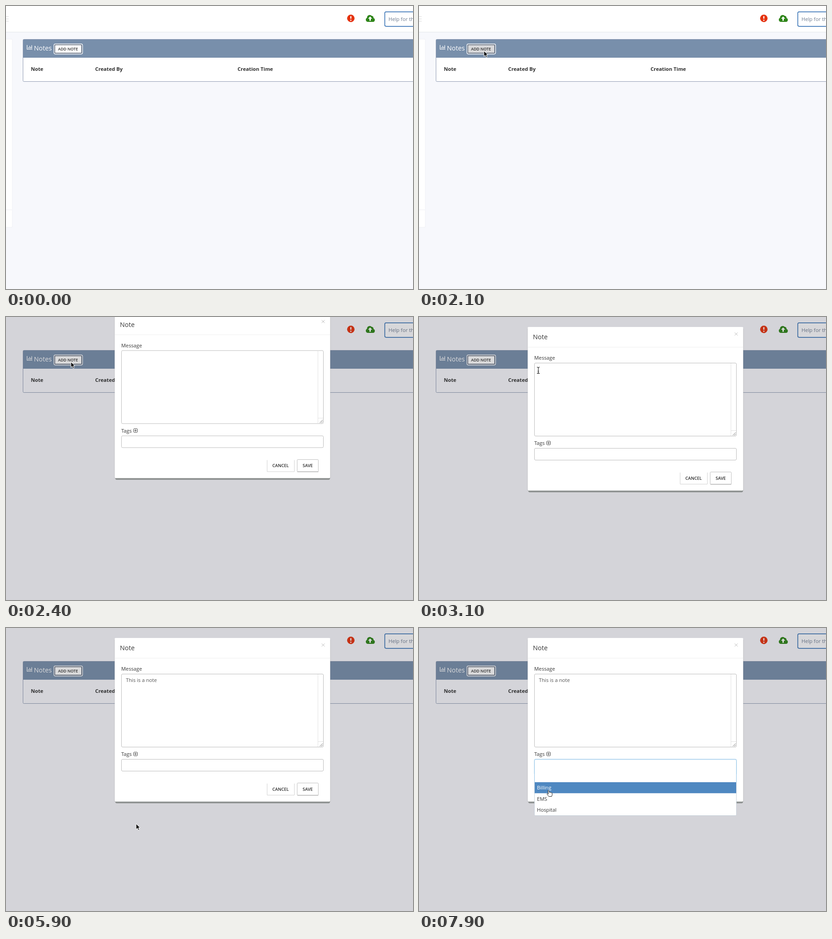
An HTML page that plays this animation: 897 by 624 pixels, repeating every 8000 ms.

```html
<!DOCTYPE html>
<html lang="en">
<head>
<meta charset="utf-8">
<title>Adding a note</title>
<style>
  html, body { margin: 0; width: 100%; height: 100%; overflow: hidden; background: #f7f8fc; }
  svg { display: block; width: 897px; height: 624px; }
  text { font: 11.2px "Open Sans", sans-serif; fill: #383838; white-space: pre; }
  .title { font-size: 14.3px; }
  .head { font-weight: 700; fill: #303030; }
  .btn { font-size: 9.5px; font-weight: 600; fill: #2b2b2b; }
  .field { fill: #fff; stroke: #bcbcbc; }
  .line { fill: none; stroke: #444; }
</style>
</head>
<body>
<svg viewBox="0 0 897 624">
  <rect width="897" height="624" fill="#f7f8fc"/>

  <g id="panels">
    <rect width="897" height="57" fill="#fff"/>
    <path d="M0 57.5H897" stroke="#e3e5ea"/>
    <path d="M0 23.5H6M0 28.5H6M0 33.5H6" stroke="#d9d9d9"/>
    <rect x="-5" y="73" width="19" height="415" rx="2" fill="#fff" stroke="#eff0f4"/>
    <path d="M0 449.5H13" stroke="#edeff4"/>
    <rect x="38" y="114" width="870" height="52" fill="#fff"/>
  </g>

  <circle cx="760" cy="27.3" r="8.2" fill="#e5330f"/>
  <path d="M760 22.3V28" stroke="#fff" stroke-width="2.4"/>
  <circle cx="760" cy="31.4" r="1.4" fill="#fff"/>

  <path d="M797 35A4.8 4.8 0 0 1 795.6 26A6 6 0 0 1 806 21.8A4 4 0 0 1 810 26.5A4.4 4.4 0 0 1 809 35Z" fill="#2f8519"/>
  <path d="M802.5 23L807 28H804V32.5H801V28H798Z" fill="#fff"/>

  <rect x="834.8" y="12.8" width="80" height="32" rx="3" fill="#fff" fill-opacity=".5" stroke="#3f78b8" stroke-width="1.7"/>
  <text x="843" y="33" style="fill:#6f7d92">Help for the page</text>

  <rect x="37.5" y="73.5" width="880" height="93" rx="2" fill="none" stroke="#8e9ab2"/>
  <rect x="38" y="74" width="870" height="40" fill="#788fab"/>
  <path d="M46.5 86V95.5H58M49.5 94V91M52 94V88M54.5 94V90M56.7 94V86.5" fill="none" stroke="#fff" stroke-width="1.2"/>
  <text class="title" x="61.5" y="98.3" style="fill:#fff">Notes</text>

  <rect x="105.7" y="83.7" width="63" height="22" rx="3" fill="#62728b" stroke="#fff" stroke-width="1.4"/>
  <rect id="add" x="107.8" y="85.8" width="58.8" height="18" rx="1.5" stroke="#5b6472"/>
  <text class="btn" x="114.7" y="98.2" style="font-size:8.7px">ADD NOTE</text>

  <text class="head" x="54.7" y="142.6">Note</text>
  <text class="head" x="196.5" y="142.6">Created By</text>
  <text class="head" x="510.2" y="142.6">Creation Time</text>

  <rect id="shade" width="897" height="624" fill="#323237"/>

  <g id="modal">
    <rect x="238.5" y="24" width="477" height="360" rx="3" fill="#000" opacity=".1"/>
    <rect x="241" y="30" width="473" height="356.5" rx="3" fill="#8d9190"/>
    <rect x="239.5" y="22" width="475" height="360.8" rx="2" fill="#fff"/>
    <path d="M240 66.5H714" stroke="#efefef"/>
    <text class="title" x="251" y="49">Note</text>
    <path d="M695.7 34.2L702.3 40.8M702.3 34.2L695.7 40.8" stroke="#bbb"/>

    <text x="254" y="94">Message</text>
    <rect class="field" x="254.5" y="101.5" width="445" height="161" rx="2.5"/>
    <path d="M687.5 102V250.5H699M687.5 250V262" fill="none" stroke="#e2e2e2"/>
    <path d="M691.5 261L698 254.5M695 261L698 258" stroke="#777"/>
    <text id="message" x="264.3" y="118.6" xml:space="preserve" style="fill:#555"></text>

    <text x="254" y="282">Tags</text>
    <rect class="line" x="281.5" y="273.8" width="8" height="8" rx="1"/>
    <path class="line" d="M283 277.8H288M285.5 275.3V280.3"/>
    <rect class="field" x="254.5" y="289.5" width="445" height="26" rx="2.5"/>

    <path d="M575.5 343V368.5H635.5V343" fill="none" stroke="#d2d2d2"/>
    <text class="btn" x="587" y="358.8">CANCEL</text>
    <rect class="field" x="641.8" y="341.8" width="46.5" height="26.7" rx="1.5"/>
    <path d="M642 369H688.5" stroke="#aaa"/>
    <text class="btn" x="653.8" y="358.8">SAVE</text>
  </g>

  <g id="dropdown">
    <rect x="253.5" y="288.5" width="447" height="36" rx="4" fill="#c9e3f6"/>
    <rect x="254.5" y="316" width="445" height="97.5" rx="2" fill="#fff" stroke="#c9d3dc"/>
    <path d="M254.5 340V292.5Q254.5 289.8 257 289.8H697Q699.5 289.8 699.5 292.5V340" fill="#fff" stroke="#8fc2e6"/>
    <rect x="255" y="340" width="444" height="24.3" fill="#4f88c1"/>
    <text x="260" y="356.2" style="fill:#fff">Billing</text>
    <text x="260" y="380.8">EMS</text>
    <text x="260" y="405.4">Hospital</text>
  </g>

  <rect id="caret" width="1" height="15" fill="#444"/>

  <g id="pointer">
    <circle id="ring" cy="-.5" r="14.6" fill="#fff" fill-opacity=".6" stroke="#111" stroke-width="1.3"/>
    <path id="arrow" d="M0 0V12.3L2.9 9.6L5 14.3L7.2 13.3L5.2 8.8H9Z" fill="#111" stroke="#fff"/>
    <path id="ibeam" d="M-3 -6.5Q0 -6.5 0 -4.5Q0 -6.5 3 -6.5M0 -5V6M-3 7.5Q0 7.5 0 5.5Q0 7.5 3 7.5M-1.5 2.5H1.5" fill="none" stroke="#111" stroke-width="1.1"/>
    <path id="hand" d="M-.5 1.2Q.8 -.8 1.8 1.2L2.6 5L4 4.6L5.2 5.2L6.6 5.1L7.6 6.1Q9 6 9 7.8V10.5L7.8 14H1.5L-2.2 9.2Q-3 7.5 -1.2 7.6L.7 8.8Z" fill="#fff" stroke="#222"/>
  </g>
</svg>
<script>
  const LOOP = 8000, STEP = 100;
  const ui = Object.fromEntries([...document.querySelectorAll('[id]')].map(el => [el.id, el]));
  const MESSAGE = 'This is a note';

  // [time, value, ...] rows
  const PATH = [
    [100, 330, 405], [900, 150, 138], [1300, 143, 99], [2500, 143, 99],
    [3200, 270, 118], [5700, 270, 118], [5800, 287, 438], [6500, 283, 325],
    [6800, 282.5, 297.5], [7300, 282.5, 297.5], [7800, 284.5, 357.5]
  ];
  const SHADE = [[2100, 0], [2200, .11], [2300, .16], [2400, .175]];
  const SLIDE = [[2300, -66], [2400, -27.5], [2500, -7], [2600, 0]];
  const FADE = [[2200, 0], [2300, .6], [2400, 1]];

  const smooth = p => p * p * (3 - 2 * p);
  const within = (t, from, to) => t >= from && t < to;
  const show = (el, on) => el.setAttribute('visibility', on ? 'visible' : 'hidden');

  function sample(rows, t) {
    const next = rows.findIndex(row => row[0] > t);
    if (next === 0) return rows[0].slice(1);
    if (next < 0) return rows.at(-1).slice(1);
    const a = rows[next - 1], b = rows[next];
    const p = smooth((t - a[0]) / (b[0] - a[0]));
    return a.slice(1).map((v, i) => v + (b[i + 1] - v) * p);
  }

  function typedCount(t) {
    if (t < 4300) return 0;
    if (t < 4800) return Math.min(5, [1, 2, 4, 5][(t - 4300) / STEP] ?? 5);
    return Math.min(MESSAGE.length, 6 + (t - 4800) / STEP);
  }

  function drawCaret(t) {
    const inTags = t >= 7000;
    const typing = within(t, 4300, 5700);
    const blinkOn = Math.floor((t - 3300) / 500) % 2 === 0;
    show(ui.caret, inTags ? t < 7500 : t >= 3300 && (typing || blinkOn));
    ui.caret.setAttribute('x', inTags ? 264.5 : 264.3 + ui.message.getComputedTextLength());
    ui.caret.setAttribute('y', inTags ? 295 : 107);
    ui.caret.setAttribute('opacity', inTags ? .6 : 1);
  }

  function drawPointer(t, open) {
    const [x, y] = sample(PATH, t);
    const visible = within(t, 100, 4400) || t >= 5800;
    const inText = t >= 2400 && x > 254 && x < 687 && (within(y, 101, 262) || within(y, 289, 316));
    const kind = inText ? 'ibeam' : open && y > 340 ? 'hand' : 'arrow';
    ui.pointer.setAttribute('transform', `translate(${x} ${y})`);
    for (const name of ['arrow', 'ibeam', 'hand']) show(ui[name], visible && name === kind);
    show(ui.ring, within(t, 1900, 2100) || within(t, 3200, 3400) || within(t, 6900, 7200));
  }

  function render(now) {
    const t = Math.floor(now % LOOP / STEP) * STEP;
    const open = t >= 7200;
    ui.add.setAttribute('fill', within(t, 1200, 2200) ? '#d8d8da' : '#fff');
    ui.shade.setAttribute('opacity', sample(SHADE, t)[0]);
    ui.panels.setAttribute('opacity', t < 2300 ? 1 : t < 2400 ? .5 : 0);
    ui.modal.setAttribute('opacity', sample(FADE, t)[0]);
    ui.modal.setAttribute('transform', `translate(0 ${sample(SLIDE, t)[0]})`);
    ui.message.textContent = MESSAGE.slice(0, typedCount(t));
    show(ui.dropdown, open);
    drawCaret(t);
    drawPointer(t, open);
  }

  const start = performance.now();
  function tick() {
    render(performance.now() - start);
    requestAnimationFrame(tick);
  }
  tick();
</script>
</body>
</html>
```
